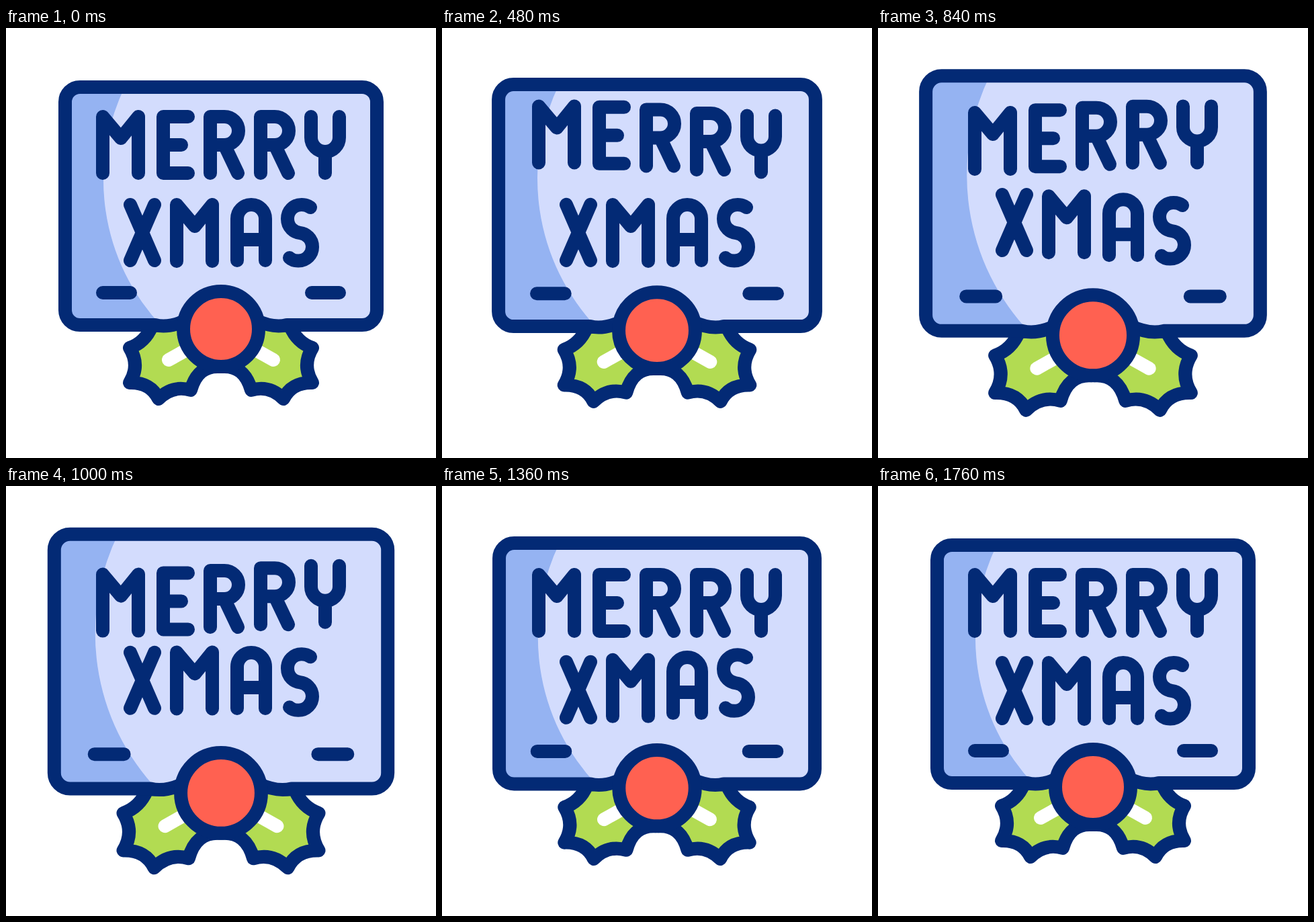
Write an HTML page that moves like this. It is 640 by 640 pixels and loops after 1.92 s.

```html
<!DOCTYPE html>
<html lang="en">
<head>
<meta charset="utf-8">
<title>Merry Xmas</title>
<style>
  html, body { margin: 0; width: 100%; height: 100%; overflow: hidden; background: #fff; }
  svg { display: block; width: 100%; height: 100%; }
  .line { stroke: #032a75; stroke-linecap: round; stroke-linejoin: round; }
</style>
</head>
<body>
<svg viewBox="0 0 640 640" role="img" aria-label="Merry Xmas">
  <defs>
    <path id="board" d="M110 88H530A22 22 0 0 1 552 110V420A22 22 0 0 1 530 442H418Q398 447 372 435H268Q242 447 222 442H110A22 22 0 0 1 88 420V110A22 22 0 0 1 110 88Z"/>
    <clipPath id="inside"><use href="#board"/></clipPath>
    <g id="leaf">
      <path class="line" fill="#b2db52" d="M184 476Q200 502 184 528Q215 527 227 552Q248 531 275 539Q285 502 318 504L266 436L217 444Q207 468 184 476Z"/>
      <path d="M242 494L285 470" stroke="#fff" stroke-linecap="round"/>
    </g>
  </defs>
  <g id="card">
    <use href="#leaf"/>
    <use href="#leaf" transform="matrix(-1 0 0 1 640 0)"/>
    <use href="#board" fill="#d3dcfd"/>
    <path clip-path="url(#inside)" fill="#95b3f2" d="M80 80H180.6A317 317 0 0 0 233.8 446H80Z"/>
    <use href="#board" class="line" fill="none"/>
    <path class="line" d="M144 394H185M455 394H496"/>
    <circle class="line" cx="320" cy="448" r="56" fill="#ff6151"/>
  </g>
  <g id="letters" class="line" fill="none" stroke-width="20"></g>
</svg>
<script>
const LOOP = 1920, STEP = 40;
const LIFT = 15.6, STAGGER = 80, GROW = 0.073, STROKE = 20;

const glyphs = {
  M: "M0 84V0L27 32L53 0V84",
  E: "M37 0H0V84H37M0 42H27",
  R: "M0 84V0H21a21 21 0 0 1 0 42H0M21 42L41 84",
  Y: "M0 0V31a21 21 0 0 0 42 0V0M21 52V84",
  X: "M0 0L36 83M36 0L0 83",
  A: "M0 83V21a21 21 0 0 1 42 0V83M0 52H42",
  S: "M34 4C30 1 26 0 21 0C9 0 0 9 0 21C0 34 10 41 18.5 42S37 50 37 63C37 74 28 83.5 16 83.5C11 83.5 6 82 3 79"
};
const rows = [
  { text: "MERRY", y: 132, xs: [144, 234, 304, 379, 454] },
  { text: "XMAS", y: 263, xs: [185, 254, 344, 419] }
];

const card = document.getElementById("card");
const letters = [];
for (const { text, y, xs } of rows) {
  [...text].forEach((ch, i) => {
    const el = document.createElementNS("http://www.w3.org/2000/svg", "path");
    el.setAttribute("d", glyphs[ch]);
    document.getElementById("letters").append(el);
    letters.push({ el, x: xs[i], y });
  });
}

// Symmetric cubic-bezier(a, 0, 1 - a, 1)
function ease(x, a) {
  if (x <= 0) return 0;
  if (x >= 1) return 1;
  let lo = 0, hi = 1, u = 0.5;
  for (let i = 0; i < 24; i++) {
    u = (lo + hi) / 2;
    const v = 1 - u;
    if (3 * u * v * (v * a + u * (1 - a)) + u * u * u < x) lo = u;
    else hi = u;
  }
  return u * u * (3 - 2 * u);
}

const ramp = (t, from, to, a) => ease((t - from) / (to - from), a);
const lift = t => LIFT * (ramp(t, 40, 520, 0.55) - ramp(t, 560, 1045, 0.333));
const scale = t => 1 + GROW * (ramp(t, 265, 875, 0.5) - ramp(t, 885, 1575, 0.5));

function draw(t) {
  const s = scale(t);
  card.setAttribute("transform", `translate(320 320) scale(${s}) translate(-320 -320)`);
  card.setAttribute("stroke-width", STROKE / s); // outlines keep their weight
  letters.forEach(({ el, x, y }, i) => {
    el.setAttribute("transform", `translate(${x} ${y - lift(t - i * STAGGER)})`);
  });
}

const start = performance.now();
function tick() {
  const t = (performance.now() - start) % LOOP;
  draw(Math.floor(t / STEP) * STEP);
  requestAnimationFrame(tick);
}
tick();
</script>
</body>
</html>
```
